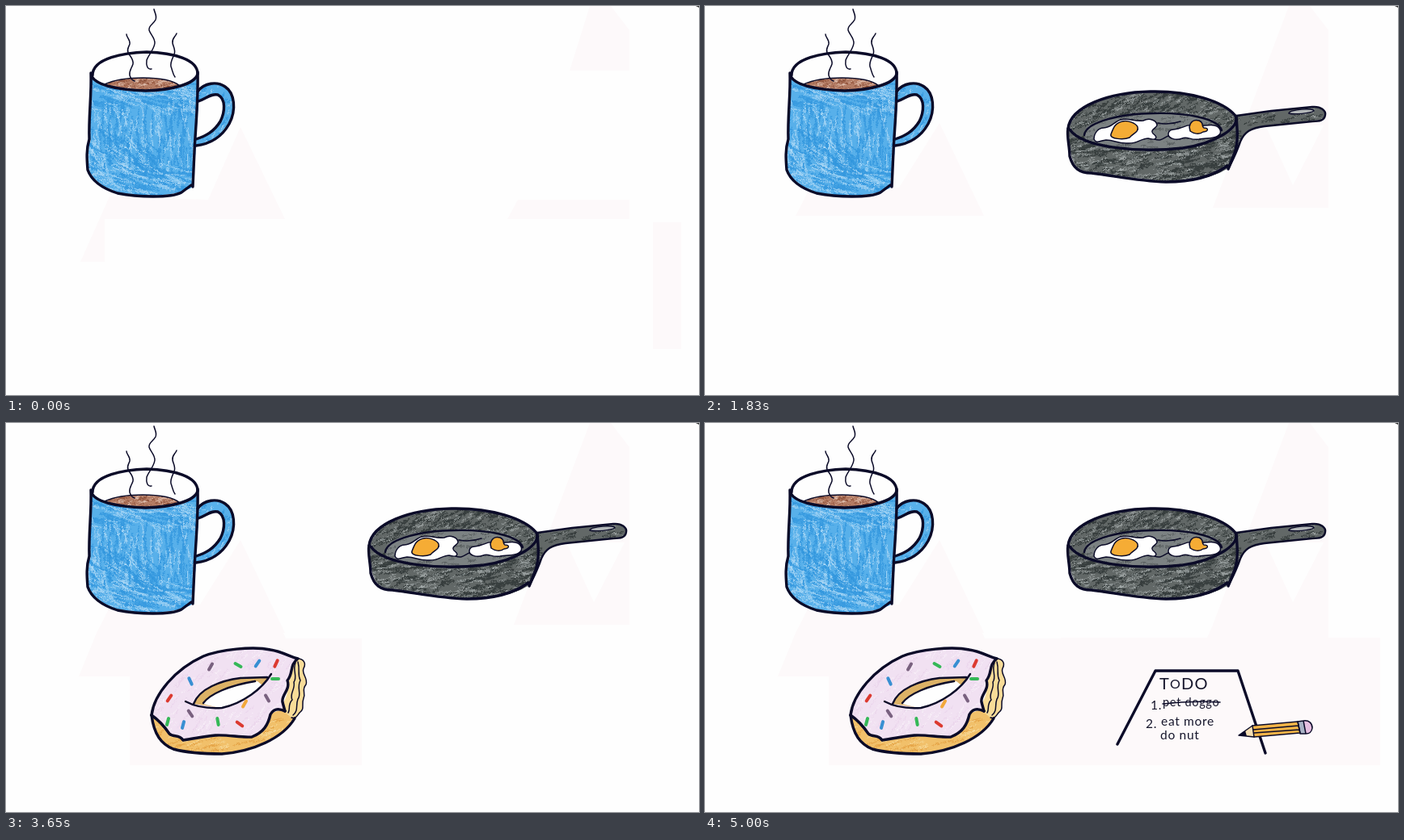
These frames come from a looping animation (857x482 px, 5040 ms). An HTML page:

```html
<!DOCTYPE html>
<html lang="en">
<head>
<meta charset="utf-8">
<title>Morning doodles</title>
<style>
  html, body { margin: 0; width: 100%; height: 100%; overflow: hidden; background: #fefefe; }
  svg { display: block; width: 100%; height: 100%; }

  .ink { fill: none; stroke: #0b0b28; stroke-width: 3.4; stroke-linecap: round; stroke-linejoin: round; }
  .mid { stroke-width: 2.4; }
  .thin { stroke-width: 1.5; }
  .tint { fill: #fdf9fa; fill-rule: evenodd; }
  .marks path { fill: none; stroke-linecap: round; filter: url(#grain); }
  .note { font: 15.5px Lato, "Open Sans", sans-serif; fill: #16162c; letter-spacing: .7px; }
  .title { font-size: 20px; letter-spacing: 1.2px; }
  .small { font-size: 14.5px; }

  .first, .second, .third, .fourth { animation: 5040ms step-end infinite; }
  .first { animation-name: first; }
  .second { animation-name: second; }
  .third { animation-name: third; }
  .fourth { animation-name: fourth; }
  @keyframes first { 0% { opacity: 1 } 25%, 100% { opacity: 0 } }
  @keyframes second { 0% { opacity: 0 } 25%, 100% { opacity: 1 } }
  @keyframes third { 0% { opacity: 0 } 50%, 100% { opacity: 1 } }
  @keyframes fourth { 0% { opacity: 0 } 75%, 100% { opacity: 1 } }
</style>
</head>
<body>
<svg viewBox="0 0 857 482" xmlns="http://www.w3.org/2000/svg">
  <defs>
    <filter id="grain" color-interpolation-filters="sRGB">
      <feTurbulence type="fractalNoise" baseFrequency=".45" numOctaves="2" seed="4"/>
      <feDisplacementMap in="SourceGraphic" scale="5" xChannelSelector="R" yChannelSelector="G"/>
    </filter>
    <path id="mug" d="M106 88C112 97 142 104 173 105C205 104 229 98 237 88V104C246 95 261 93 271 100C283 108 285 129 276 146C267 162 252 171 235 173L231 224C213 236 155 241 122 226C108 219 100 210 100 200L103 165Z
      M238 118C247 115 254 108 262 110C272 115 271 131 265 143C257 156 247 161 235 165Z" clip-rule="evenodd" fill-rule="evenodd"/>
    <path id="coffee" d="M122 97C135 91 150 89 169 89C190 89 207 92 215 99C195 107 145 106 122 97Z"/>
    <path id="pan" d="M449 152C452 124 500 107 551 106C600 105 641 118 656 136L700 130L751 125C762 124 768 130 767 135C766 142 760 143 751 143L692 149C675 151 667 156 662 168C657 183 653 190 648 200C630 213 600 218 570 218C535 217 500 211 470 207C455 201 451 186 449 152Z"/>
    <path id="floor" d="M470 152C482 139 517 133 555 133C595 132 628 139 639 152C632 165 611 173 588 176C540 180 492 176 469 163Z"/>
    <path id="dough" d="M180 362C183 386 192 398 207 404C225 409 248 410 267 410C305 407 342 391 357 366L345 354L320 362L300 386L220 388L195 370Z"/>
    <path id="icing" d="M180 362C183 336 209 305 244 289C264 281 305 276 327 281C341 283 352 290 361 292C350 300 356 309 348 319C352 331 340 337 342 346L345 357C337 353 331 354 327 361C324 374 319 383 304 389C289 390 276 386 259 387C246 388 233 391 219 393C214 385 207 390 202 385C196 376 190 369 180 362Z"/>
    <path id="bite" d="M361 292C367 292 372 297 368 304C365 311 374 316 371 324C365 331 371 334 368 341C365 349 370 354 363 359C360 363 358 367 353 365L342 356C340 347 350 338 348 328C346 321 356 313 354 305C352 300 355 296 361 292Z"/>
    <path id="pencil" d="M660 387L677 375L733 370L736 384L679 389Z"/>
    <clipPath id="in-mug"><use href="#mug" clip-rule="evenodd"/></clipPath>
    <clipPath id="in-coffee"><use href="#coffee"/></clipPath>
    <clipPath id="in-pan"><use href="#pan"/></clipPath>
    <clipPath id="in-floor"><use href="#floor"/></clipPath>
    <clipPath id="in-dough"><use href="#dough"/></clipPath>
    <clipPath id="in-icing"><use href="#icing"/></clipPath>
  </defs>

  <!-- faint paper tint -->
  <g class="tint">
    <path class="first" d="M128 236L92 317H122V264H345L290 150L250 240ZM722 0H748L771 30V80H697ZM633 240H771V264H620ZM800 268H835V425H800Z"/>
    <path class="second" d="M112 260L130 225H240L290 145L345 260ZM722 0H748L771 30V250H628ZM693 148H765L727 222Z"/>
    <path class="third" d="M112 260L90 314H153V424H440V267H346L343 260Z"/>
    <path class="fourth" d="M628 250L621 266H440V424H835V266H771V250Z"/>
  </g>
  <path d="M853 0H857V2Z" fill="#333"/>

  <g>
    <use href="#mug" fill="#58b0ea"/>
    <g id="mug-marks" class="marks" clip-path="url(#in-mug)"/>
    <path d="M107 83C112 63 147 58 174 57C207 58 237 66 237 86C231 98 205 104 173 105C142 104 110 99 107 83Z" fill="#fefefe"/>
    <use href="#coffee" fill="#b47c64"/>
    <g id="coffee-marks" class="marks" clip-path="url(#in-coffee)"/>
    <g class="ink">
      <path class="thin" d="M122 97C135 91 150 89 169 89C190 89 207 92 215 99"/>
      <path d="M107 86C107 64 147 58 174 57C207 58 237 66 237 84C234 97 205 104 173 105C142 104 112 99 106 87"/>
      <path d="M105 83C106 110 102 136 103 165C99 178 100 190 101 203C106 217 119 226 138 232C163 237 204 238 217 231L229 222M237 82C238 120 234 155 233 180L231 224"/>
      <path d="M237 106C245 95 261 93 271 100C283 108 285 129 276 146C267 162 252 171 235 173M238 118C247 115 254 108 262 110C272 115 271 131 265 143C257 156 247 161 235 165"/>
      <path class="thin" d="M149 35C149 39 154 42 153 47C152 51 149 53 151 58C154 63 158 66 157 72C155 78 152 80 153 86Q155 92 159 93M183 4C184 9 187 12 185 17C182 23 176 24 177 30C179 36 184 39 184 46C183 54 176 61 174 67C173 74 175 79 180 78M211 34C209 39 205 40 206 46C207 51 210 54 208 60C206 65 203 69 204 75C206 80 206 84 209 88"/>
    </g>
  </g>

  <g class="second">
    <use href="#pan" fill="#626867"/>
    <g id="pan-marks" class="marks" clip-path="url(#in-pan)"/>
    <use href="#floor" fill="#7c8283"/>
    <g id="floor-marks" class="marks" clip-path="url(#in-floor)"/>
    <g class="ink thin">
      <path d="M560 145C570 147 579 146 588 143M556 165C565 168 567 163 573 161"/>
      <path fill="#fff" d="M481 165C481 158 486 151 493 151C503 151 506 143 514 141C524 138 532 144 542 142C550 138 559 142 559 148C557 152 550 154 554 158C561 163 558 167 548 164C540 164 533 171 523 170C510 171 507 166 496 166C488 167 484 171 481 165Z"/>
      <path fill="#f5ac35" d="M502 159C505 151 507 145 516 143C522 141 533 145 535 150C537 156 529 158 525 163C518 166 500 165 502 159Z"/>
      <path fill="#fff" d="M573 158C574 151 582 154 588 151C593 150 596 147 601 148C612 150 625 146 630 148C638 150 640 158 634 161C628 165 618 163 611 165C601 167 597 161 590 164C582 167 572 164 573 158Z"/>
      <path fill="#f5ac35" d="M599 150C600 144 604 140 611 142C618 145 613 149 617 151C622 151 624 155 616 156C611 160 604 158 600 155Z"/>
    </g>
    <g class="ink">
      <path d="M449 152C452 124 500 107 551 106C600 105 641 118 656 136C663 150 632 170 591 176C537 182 467 176 451 153"/>
      <path class="mid" d="M469 160C471 143 517 133 555 133C595 132 634 139 639 154"/>
      <path d="M449 152C447 160 451 175 451 186C455 201 463 207 478 207C505 210 535 217 570 218C603 218 628 211 646 198M657 137C658 151 660 168 655 182L647 202"/>
      <path class="mid" d="M657 136L700 130L751 125C762 124 768 130 767 135C766 142 760 143 751 143L692 149C675 151 667 156 662 168C657 183 653 190 647 202"/>
      <path class="thin" d="M722 133C722 128 754 126 753 130C749 133 728 135 722 133Z" fill="#b4b8b9"/>
    </g>
  </g>

  <g class="third">
    <use href="#dough" fill="#f1c06a"/>
    <g id="dough-marks" class="marks" clip-path="url(#in-dough)"/>
    <use href="#icing" fill="#f1e1f2"/>
    <g id="icing-marks" class="marks" clip-path="url(#in-icing)"/>
    <path d="M232 348C239 329 266 319 290 316L325 314C316 329 295 346 267 353Z" fill="#ddb266"/>
    <path d="M243 348C249 337 277 325 311 320L317 325C301 342 282 351 264 353Z" fill="#fefefe"/>
    <use href="#bite" fill="#f8dc98"/>
    <g class="ink">
      <path class="thin" d="M361 292C367 292 372 297 368 304C365 311 374 316 371 324C365 331 371 334 368 341C365 349 370 354 363 359C360 363 358 367 353 365M361 296C364 307 360 311 364 319C359 328 366 336 361 342C358 350 362 356 355 362M358 297C354 307 361 314 356 321C358 331 350 335 354 343C348 349 352 354 349 359"/>
      <path d="M180 362C183 336 209 305 244 289C264 281 305 276 327 281C341 283 352 290 361 292C350 300 356 309 348 319C352 331 340 337 342 346L345 357"/>
      <path d="M180 362C190 369 196 376 202 385C207 390 214 385 219 393C233 391 246 388 259 387C276 386 289 390 304 389C319 383 324 374 327 361C331 354 337 353 345 357"/>
      <path d="M180 362C183 386 192 398 207 404C225 409 248 410 267 410C305 407 342 391 357 366"/>
      <path class="mid" d="M222 345C235 352 251 354 267 353C294 347 317 329 328 311M232 348C239 329 266 319 290 316L323 315M244 347C252 336 276 325 308 320"/>
    </g>
    <g id="sprinkles" stroke-width="4" stroke-linecap="round"/>
  </g>

  <g class="fourth">
    <path class="ink" d="M510 398L557 307H659L693 409"/>
    <g class="note">
      <text class="title" x="562" y="330">T<tspan font-size="16" dy="-1">O</tspan><tspan dy="1">DO</tspan></text>
      <text x="551" y="355">1.</text>
      <text class="small" x="566" y="351">pet doggo</text>
      <text x="545" y="378">2.</text>
      <text x="564" y="375">eat more</text>
      <text x="563" y="392">do nut</text>
    </g>
    <path class="ink thin" d="M566 348Q600 344 637 346"/>
    <use href="#pencil" fill="#f3b447"/>
    <path d="M660 387L677 375L679 389Z" fill="#f6dfb3"/>
    <path d="M660 387L668 381L670 388Z" fill="#0b0b28"/>
    <path d="M733 370L740 369L743 385L736 385Z" fill="#a9b3c6"/>
    <path d="M740 369C747 368 751 372 751 378C750 384 747 385 743 385Z" fill="#e5bfe0"/>
    <g class="ink thin">
      <use href="#pencil"/>
      <path d="M677 375L679 389M678 380L734 375M679 384L735 380M733 370L740 369C747 368 751 372 751 378C750 384 747 385 743 385L736 385ZM740 369L743 385"/>
    </g>
  </g>
</svg>

<script>
  const byId = id => document.getElementById(id);

  let seed = 11;
  function rand() {
    seed = (seed * 1664525 + 1013904223) % 4294967296;
    return seed / 4294967296;
  }

  function addPath(parent, attrs) {
    const path = document.createElementNS("http://www.w3.org/2000/svg", "path");
    for (const key in attrs) path.setAttribute(key, attrs[key]);
    parent.append(path);
  }

  // Crayon strokes of one colour spread over a box.
  function scribble(id, color, [x, y, w, h], angle, length, count, width = 1) {
    let d = "";
    for (let i = 0; i < count; i++) {
      const a = (angle + (rand() - .5) * 26) * Math.PI / 180;
      const len = length * (.4 + rand());
      const dx = Math.cos(a) * len, dy = Math.sin(a) * len;
      const px = x + rand() * w - dx / 2, py = y + rand() * h - dy / 2;
      d += `M${px.toFixed(1)} ${py.toFixed(1)}l${dx.toFixed(1)} ${dy.toFixed(1)}`;
    }
    addPath(byId(id), { d, stroke: color, "stroke-width": width, "stroke-opacity": .75 });
  }

  const mugZones = [
    [[104, 96, 134, 36], 14, 30, 55],
    [[102, 122, 134, 82], 88, 24, 110],
    [[102, 165, 80, 40], 38, 32, 25],
    [[100, 198, 134, 38], 16, 32, 55],
    [[236, 95, 46, 78], 120, 10, 35]
  ];
  for (const [box, angle, length, count] of mugZones) {
    scribble("mug-marks", "#2f94dd", box, angle, length, count, 1.7);
    scribble("mug-marks", "#b4ddf7", box, angle, length * .7, count, 1.1);
  }
  scribble("coffee-marks", "#8a4c36", [122, 89, 93, 15], 165, 10, 45);
  scribble("coffee-marks", "#e6c8b8", [122, 89, 93, 15], 160, 6, 40);

  const panZones = [
    [[449, 106, 208, 45], -24, 12, 230],
    [[449, 160, 208, 58], -12, 16, 320],
    [[655, 124, 112, 46], -8, 12, 60]
  ];
  for (const [box, angle, length, count] of panZones) {
    scribble("pan-marks", "#2a3031", box, angle, length, count, 1.5);
    scribble("pan-marks", "#a9afaf", box, angle, length * .6, count * .8, 1);
  }
  scribble("floor-marks", "#4b5152", [470, 133, 170, 44], -10, 12, 110);

  scribble("dough-marks", "#e29c3e", [180, 362, 178, 48], -18, 14, 60, 1.3);
  scribble("dough-marks", "#f9dfa4", [180, 362, 178, 48], -18, 12, 60);
  scribble("icing-marks", "#e8d0ea", [180, 280, 180, 112], -50, 16, 110);
  scribble("icing-marks", "#faf3fa", [180, 280, 180, 112], -50, 14, 110);

  const red = "#dc3a30", green = "#35b857", blue = "#388fd2", plum = "#79617f", orange = "#f2a83b";
  const sprinkles = [
    [253, 302, -60, plum], [287, 300, 30, green], [311, 298, -55, blue], [334, 298, -65, red],
    [333, 317, 0, green], [228, 320, 65, blue], [202, 341, -55, red], [228, 360, 55, plum],
    [200, 370, -75, green], [219, 374, -75, blue], [262, 370, 80, green], [289, 373, 35, red],
    [295, 348, -60, orange], [323, 341, 60, plum]
  ];
  for (const [x, y, angle, stroke] of sprinkles) {
    addPath(byId("sprinkles"), { d: "M-4 0H4", stroke, transform: `translate(${x} ${y}) rotate(${angle})` });
  }
</script>
</body>
</html>
```
